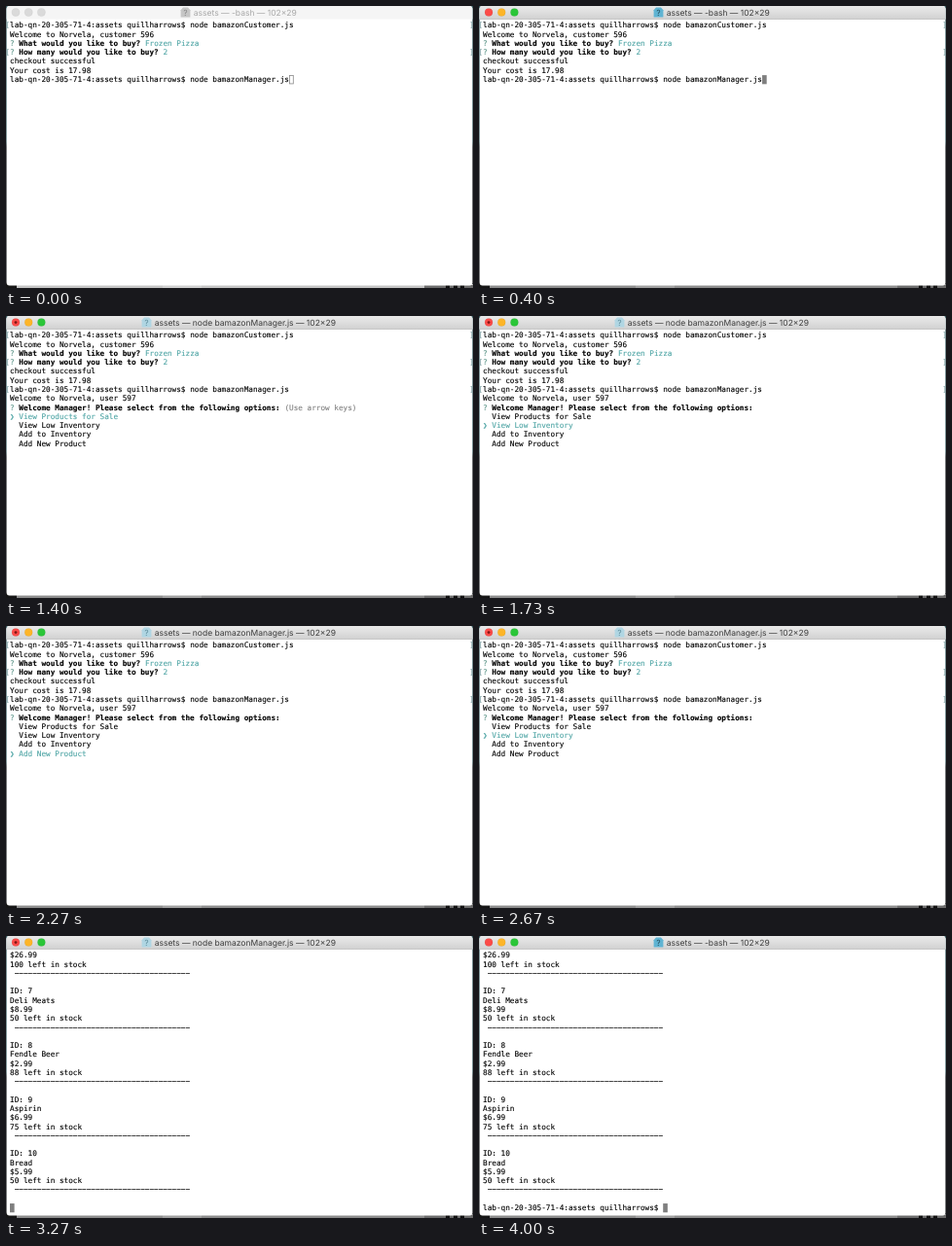
An HTML page for the animation above (5.59 s loop, 480 px wide and 290 px high).

```html
<!DOCTYPE html>
<html lang="en">
<head>
<meta charset="utf-8">
<title>Terminal session</title>
<style>
  html, body { margin: 0; width: 100%; height: 100%; overflow: hidden; background: #fff; }
  svg { display: block; width: 100vw; height: 100vh; }
  text { white-space: pre; text-rendering: geometricPrecision; }
  .term text {
    font: 7.69px "DejaVu Sans Mono", monospace; color: #000;
    fill: currentColor; stroke: currentColor; stroke-width: .12px;
  }
  .term .b { font-weight: bold; }
  .term .c { color: #4fa5a5; }
  .term .q { color: #5c9488; }
  .term .d { color: #808080; }
  .term .m { color: #86a6a8; }
  .bar { font: 8.5px Inter, sans-serif; text-anchor: middle; }
</style>
</head>
<body>
<svg viewBox="0 0 480 290" preserveAspectRatio="none">
  <defs>
    <linearGradient id="active" x2="0" y2="1">
      <stop stop-color="#eaeaea"/><stop offset="1" stop-color="#d1d1d1"/>
    </linearGradient>
    <linearGradient id="edge" x2="0" y2="1">
      <stop stop-color="#33575d"/><stop offset=".48" stop-color="#3b5f64"/>
      <stop offset=".5" stop-color="#222528"/><stop offset="1" stop-color="#2c2f31"/>
    </linearGradient>
    <clipPath id="window"><rect x=".6" width="478.8" height="287.4" rx="3"/></clipPath>
  </defs>
  <g id="stage"></g>
</svg>
<script>
const LOOP = 5590;
const CW = 4.63, LH = 9.27, LEFT = 4, BASE = 22.4;
const PROMPT = 'lab-qn-20-305-71-4:assets quillharrows$ ';
const OPTIONS = ['View Products for Sale', 'View Low Inventory', 'Add to Inventory', 'Add New Product'];
const STOCK = [
  ['ID: 7', 'Deli Meats', '$8.99', '50'],
  ['ID: 8', 'Fendle Beer', '$2.99', '88'],
  ['ID: 9', 'Aspirin', '$6.99', '75'],
  ['ID: 10', 'Bread', '$5.99', '50']
];
// [time, highlighted option]
const MOVES = [[1400, 0], [1670, 1], [1930, 2], [2130, 3], [2400, 2], [2670, 1], [2930, 0]];
const T = { focus: 270, enter: 870, title: 1000, menu: 1400, list: 3270, done: 3330, saved: 4000 };

const stage = document.getElementById('stage');
const rect = (x, y, w, h, fill, more = '') =>
  `<rect x="${x}" y="${y}" width="${w}" height="${h}" fill="${fill}" ${more}/>`;
const put = (col, row, str, cls = '') =>
  `<text x="${(LEFT + col * CW).toFixed(2)}" y="${(BASE + row * LH).toFixed(2)}" class="${cls}">${str}</text>`;
const marks = row => put(-1, row, '[', 'm') + put(102, row, ']', 'm');

function cursor(col, row, solid) {
  const x = LEFT + col * CW, y = BASE - 6.9 + row * LH;
  return solid ? rect(x, y, CW, 9.2, '#7f7f7f')
    : rect(x + .4, y + .4, CW - .8, 8.4, 'none', 'stroke="#888" stroke-width=".8"');
}

function ask(row, question, answer) {
  return put(0, row, '?', 'q') + put(2, row, question, 'b') + put(3 + question.length, row, answer, 'c');
}

function session(t, focus) {
  let s = marks(0) + put(0, 0, PROMPT + 'node bamazonCustomer.js')
    + put(0, 1, 'Welcome to Norvela, customer 596')
    + ask(2, 'What would you like to buy?', 'Frozen Pizza')
    + marks(3) + ask(3, 'How many would you like to buy?', '2')
    + put(0, 4, 'checkout successful') + put(0, 5, 'Your cost is 17.98')
    + put(0, 6, PROMPT + 'node bamazonManager.js');
  if (t < T.enter) return s + cursor(62, 6, focus > .5);
  s += marks(6);
  if (t < T.menu) return s + cursor(0, 7, true);

  const picked = MOVES.filter(m => m[0] <= t).pop()[1];
  s += put(0, 7, 'Welcome to Norvela, user 597')
    + ask(8, 'Welcome Manager! Please select from the following options:', '');
  if (t < MOVES[1][0]) s += put(61, 8, '(Use arrow keys)', 'd');
  OPTIONS.forEach((name, i) => {
    const on = i === picked;
    s += put(2, 9 + i, name, on ? 'c' : '');
    if (on) s += put(0, 9 + i, '❯', 'c');
  });
  return s;
}

function listing(t) {
  const rule = ' ' + '−'.repeat(39);
  const lines = ['$26.99', '100 left in stock', rule, ''];
  for (const [id, name, price, left] of STOCK)
    lines.push(id, name, price, left + ' left in stock', rule, '');
  if (t >= T.done) lines.push(PROMPT);
  return lines.map((line, row) => put(0, row, line)).join('')
    + cursor(t < T.done ? 0 : PROMPT.length, 28, true);
}

function lights(colors, edge) {
  return colors.map((c, i) =>
    `<circle cx="${10 + 13.2 * i}" cy="6.6" r="4" fill="${c}" stroke="${edge}" stroke-width=".4"/>`).join('');
}

function folder(x, fill, ink) {
  return `<path d="M${x} 4.2L${x + 2.4} 1.6H${x + 7.4}L${x + 9.8} 4.2V11.4H${x}Z" fill="${fill}"/>`
    + `<text class="bar" x="${x + 4.9}" y="9.8" fill="${ink}" font-weight="bold">?</text>`;
}

function titleBar(t, focus) {
  const running = t >= T.title && t < T.done;
  const job = running ? 'node bamazonManager.js' : '-bash';
  const heading = (ink, fill, mark) =>
    `<text class="bar" x="245.8" y="9.8" fill="${ink}">assets — ${job} — 102×29</text>`
    + folder(running ? 139.6 : 179.6, fill, mark);
  let s = rect(0, 0, 480, 13.5, '#f5f5f5')
    + lights(['#dadada', '#dadada', '#dadada'], '#cbcbcb')
    + (focus < 1 ? heading('#a8a8a8', '#c6c6c6', '#858585') : '');
  s += `<g opacity="${focus}">` + rect(0, 0, 480, 13.5, 'url(#active)')
    + rect(0, 13, 480, .6, '#b4b4b4')
    + lights(['#fb4b48', '#fdb528', '#2bc638'], '#0002')
    + (running ? heading('#3e3e3e', '#b0d6e3', '#5f8c9b') : heading('#3e3e3e', '#5fb4d3', '#244b5a'))
    + '</g>';
  if (t >= T.title && t < T.saved) s += '<circle cx="10" cy="6.6" r="1.4" fill="#7c1512"/>';
  return s;
}

function desktop(focus) {
  const active = focus > .5;
  return rect(0, 0, 480, 290, 'url(#edge)')
    + rect(0, 286, 480, 4, active ? '#8c8c8c' : '#c4c4c4')
    + rect(0, 284, 11, 6, '#161616')
    + rect(161, 287, 40, 3, active ? '#a0a0a0' : '#d0d0d0')
    + rect(430, 287, 50, 3, '#6c6c6c')
    + [452, 460, 467].map(x => rect(x, 287, 4, 3, '#111')).join('');
}

function scene(t) {
  const focus = t < T.focus ? 0 : t < 330 ? .35 : t < 400 ? .7 : 1;
  return desktop(focus)
    + '<g clip-path="url(#window)">' + rect(0, 0, 480, 290, '#fff') + titleBar(t, focus) + '</g>'
    + `<g class="term">${t < T.list ? session(t, focus) : listing(t)}</g>`;
}

let shown = '';
function frame() {
  const next = scene(performance.now() % LOOP);
  if (next !== shown) stage.innerHTML = shown = next;
  requestAnimationFrame(frame);
}
frame();
</script>
</body>
</html>
```
